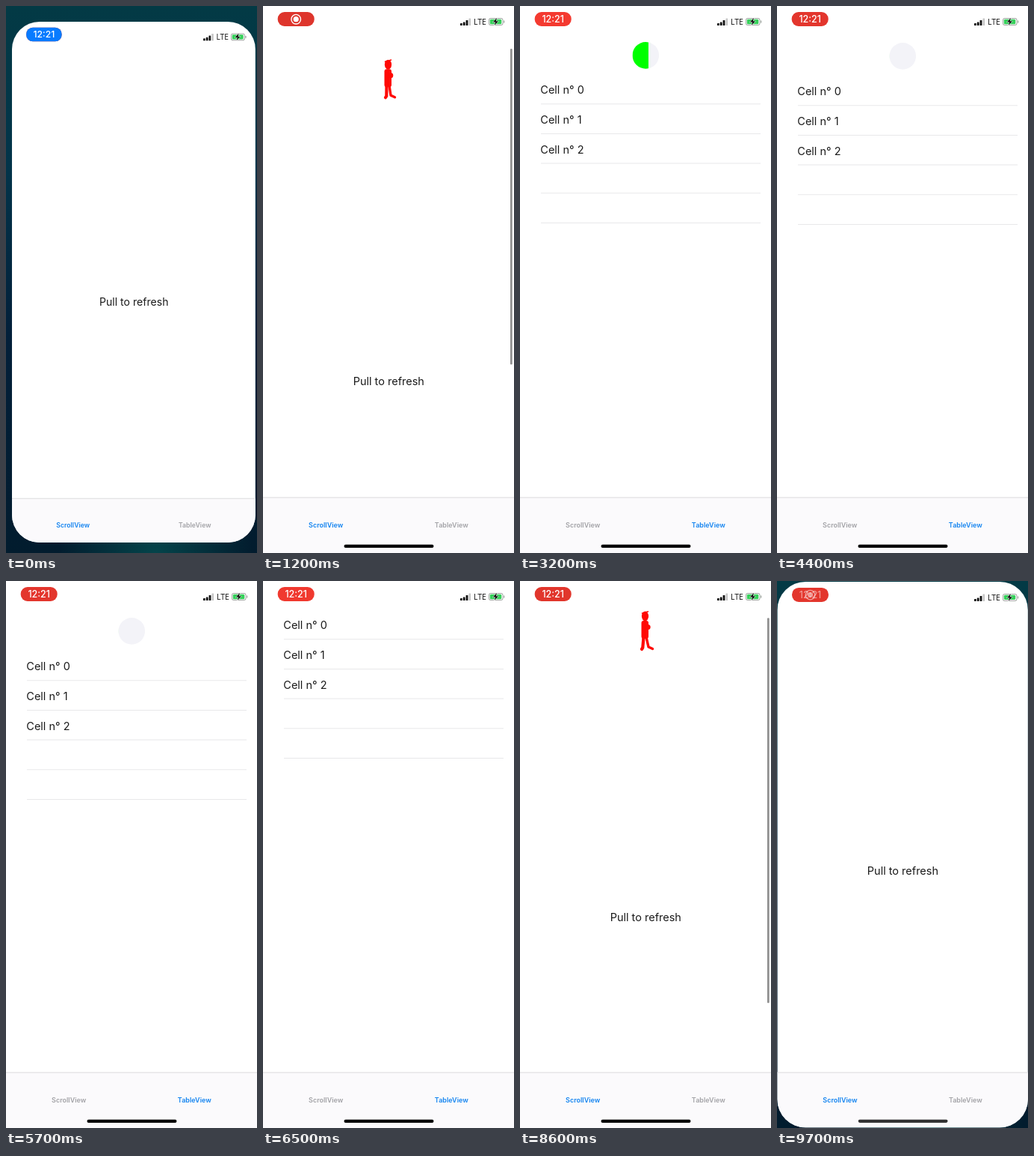
These frames come from a looping animation (336 px wide and 730 px high, 9.8 s). An HTML page with a canvas:

```html
<!DOCTYPE html>
<html lang="en">
<head>
<meta charset="utf-8">
<title>Pull to refresh</title>
<style>
  html, body { margin: 0; width: 100%; height: 100%; overflow: hidden; background: #02283a; }
  canvas { display: block; }
</style>
</head>
<body>
<canvas id="stage" width="336" height="730"></canvas>
<script>
const ctx = document.getElementById('stage').getContext('2d');
const W = 336, H = 730, LOOP = 9800;
const REST = 55; // list offset while refreshing
const BLUE = '#1384f0', GREY = '#a3a3a7';
const TABLE_FROM = 2600, TABLE_TO = 6800;

// Eased value through [time, value] pairs.
function track(t, keys) {
  if (t <= keys[0][0]) return keys[0][1];
  for (let i = 1; i < keys.length; i++) {
    const [t0, a] = keys[i - 1], [t1, b] = keys[i];
    if (t < t1) {
      const p = (t - t0) / (t1 - t0);
      return a + (b - a) * p * p * (3 - 2 * p);
    }
  }
  return keys[keys.length - 1][1];
}

const scrollPull = t => track(t, [
  [600, 0], [1200, 107], [1450, 112], [1750, REST], [2150, REST], [2450, 0],
  [7450, 0], [8000, 107], [8150, 110], [8450, REST], [8800, REST], [9100, 0]]);
const tablePull = t => track(t, [
  [2750, 0], [3200, 53], [3600, 88], [3750, 88], [4000, REST], [6150, REST], [6450, 0]]);

function box(x, y, w, h, r, fill) {
  ctx.beginPath();
  ctx.roundRect(x, y, w, h, r);
  ctx.fillStyle = fill;
  ctx.fill();
}

function disc(x, y, r, fill) {
  box(x - r, y - r, 2 * r, 2 * r, r, fill);
}

function text(str, x, y, font, fill, align = 'left') {
  ctx.font = font;
  ctx.fillStyle = fill;
  ctx.textAlign = align;
  ctx.fillText(str, x, y);
}

function line(points, width) {
  ctx.beginPath();
  for (const [x, y] of points) ctx.lineTo(x, y);
  ctx.lineWidth = width;
  ctx.stroke();
}

function withAlpha(alpha, draw) {
  if (alpha <= 0) return;
  ctx.save();
  ctx.globalAlpha *= alpha;
  draw();
  ctx.restore();
}

function wallpaper() {
  const down = ctx.createLinearGradient(0, 0, 0, H);
  down.addColorStop(0, '#033a45');
  down.addColorStop(0.3, '#03344a');
  down.addColorStop(0.6, '#03203a');
  down.addColorStop(1, '#021c2e');
  box(0, 0, W, H, 0, down);
  const glow = ctx.createRadialGradient(200, H, 0, 200, H, 130);
  glow.addColorStop(0, '#04444a');
  glow.addColorStop(1, '#04444a00');
  box(0, 600, W, 130, 0, glow);
}

function statusBar(t) {
  const pulse = 0.5 + 0.5 * Math.cos((t - 3050) / 4000 * 2 * Math.PI);
  const red = `rgb(${222 + 22 * pulse}, ${53 + 5 * pulse}, ${44 + 4 * pulse})`;
  const recording = track(t, [[200, 0], [500, 1], [2500, 1], [2800, 0], [9600, 0], [9800, 1]]);
  box(19.7, 8, 49, 19, 9, red);
  withAlpha(1 - track(t, [[150, 0], [500, 1]]), () => box(19.7, 8, 49, 19, 9, '#087bff'));
  withAlpha(1 - recording, () => text('12:21', 44.2, 22, '500 12.5px Inter, sans-serif', '#fff', 'center'));
  withAlpha(recording, () => {
    ctx.beginPath();
    ctx.arc(44.2, 17.7, 6.3, 0, 7);
    ctx.strokeStyle = '#fff';
    ctx.lineWidth = 1.4;
    ctx.stroke();
    disc(44.2, 17.7, 3.6, '#fff');
  });

  [3, 4.5, 7, 9.5].forEach((h, i) =>
    box(264 + i * 3.8, 26 - h, 2.8, h, 0.6, i < 3 ? '#111' : '#c8c8c8'));
  text('LTE', 282, 25, '500 10.5px "Open Sans", sans-serif', '#111');

  box(302, 16, 19.5, 10, 3, '#a5aaa6');
  box(303, 17, 17.5, 8, 2.2, '#fff');
  box(303.8, 17.8, 15.5, 6.4, 1.5, '#35d05a');
  box(322, 19.3, 1.3, 3.4, 0.7, '#a5aaa6');
  ctx.beginPath();
  for (const [x, y] of [[313, 15.8], [307.8, 21.6], [311, 21.6], [309.8, 26], [315, 20.3], [312, 20.3]]) ctx.lineTo(x, y);
  ctx.closePath();
  ctx.strokeStyle = '#fff';
  ctx.lineWidth = 1;
  ctx.stroke();
  ctx.fillStyle = '#111';
  ctx.fill();
}

function walker(top, swing) {
  ctx.save();
  ctx.translate(167.5, top);
  ctx.fillStyle = ctx.strokeStyle = '#ff0a05';
  ctx.lineCap = ctx.lineJoin = 'round';
  line([[-4, 3], [4, 0.8]], 1.5);
  ctx.beginPath();
  ctx.ellipse(0, 7, 4.6, 6.5, 0, 0, 7);
  ctx.fill();
  box(-5, 13, 9.5, 24, 3, '#ff0a05');
  disc(3.2 + swing, 21.5, 3.6, '#ff0a05');
  line([[-2, 35], [-2.2 - 3 * swing, 49], [-3.5 - 3 * swing, 51]], 4.2);
  line([[1.5, 35], [3.5 + 3 * swing, 48], [9 + 3 * swing, 50.5]], 3.4);
  ctx.restore();
}

function scrollScreen(t) {
  const pull = scrollPull(t);
  const settle = track(t, [[0, -9], [100, -9], [500, 0], [9450, 0], [9700, -8]]);
  if (pull > 1) {
    ctx.save();
    ctx.beginPath();
    ctx.rect(0, 39.4, W, pull);
    ctx.clip();
    const walking = (t > 1600 && t < 2500) || (t > 8300 && t < 9200);
    walker(40 + (pull - REST) * 0.6, walking ? Math.sin(t / 110) : 0);
    ctx.restore();
    withAlpha(Math.min(1, pull / 20), () =>
      box(331, 41 + 0.15 * pull, 2.7, 612 - 1.78 * pull, 1.4, '#8f8f8f'));
  }
  text('Pull to refresh', 168.3, 399.4 + pull + settle, '14.5px Inter, sans-serif', '#1a1a1a', 'center');
}

function tableScreen(t) {
  const pull = tablePull(t);
  if (pull > 0) {
    const cycle = Math.abs((t - 4400) / 650 % 2);
    const fill = t < 3750 ? pull / 88 : 1 - Math.abs(1 - cycle);
    const y = 39.4 + pull / 2;
    ctx.save();
    ctx.beginPath();
    ctx.rect(0, 39.4, W, pull);
    ctx.clip();
    disc(168.3, y, 17.8, '#f3f3f8');
    ctx.beginPath();
    ctx.rect(150.5, y - 18, 35.6 * fill, 36);
    ctx.clip();
    disc(168.3, y, 17.8, '#0f0');
    ctx.restore();
  }
  for (let i = 0; i < 5; i++) {
    const y = 59 + pull + i * 39.7;
    if (i < 3) text('Cell n° ' + i, 27.3, y + 5.2, '14.5px Inter, sans-serif', '#1a1a1a');
    box(28, y + 18.2, 294, 1, 0, '#e8e8ea');
  }
}

function tabBar(t, onTable) {
  box(0, 655.5, W, 75, 0, '#fbfafc');
  box(0, 655.5, W, 1, 0, '#dcdbde');
  const font = '600 9px Inter, sans-serif';
  text('ScrollView', 84.2, 696.2, font, onTable ? GREY : BLUE, 'center');
  text('TableView', 252.3, 696.2, font, onTable ? BLUE : GREY, 'center');
  withAlpha(track(t, [[0, 0], [100, 0], [500, 1], [9550, 1], [9850, 0.6]]), () =>
    box(108.5, 718.8, 120, 4.2, 2.1, '#000'));
}

function draw(t) {
  const onTable = t >= TABLE_FROM && t < TABLE_TO;
  const shrink = track(t, [[0, 1], [450, 0], [9600, 0], [9700, 0.045], [9800, 0.2]]);
  ctx.clearRect(0, 0, W, H);
  wallpaper();
  ctx.save();
  ctx.translate(8 * shrink, 21 * shrink);
  ctx.scale(1 - 0.03 * shrink, 1 - 0.03 * shrink);
  ctx.beginPath();
  ctx.roundRect(0, 0, W, H - 13.5 * shrink, shrink > 0 ? 38 : 0);
  ctx.clip();
  box(0, 0, W, H, 0, '#fff');
  (onTable ? tableScreen : scrollScreen)(t);
  statusBar(t);
  tabBar(t, onTable);
  ctx.restore();
}

const start = performance.now();
function frame() {
  draw((performance.now() - start) % LOOP);
  requestAnimationFrame(frame);
}
frame();
</script>
</body>
</html>
```
